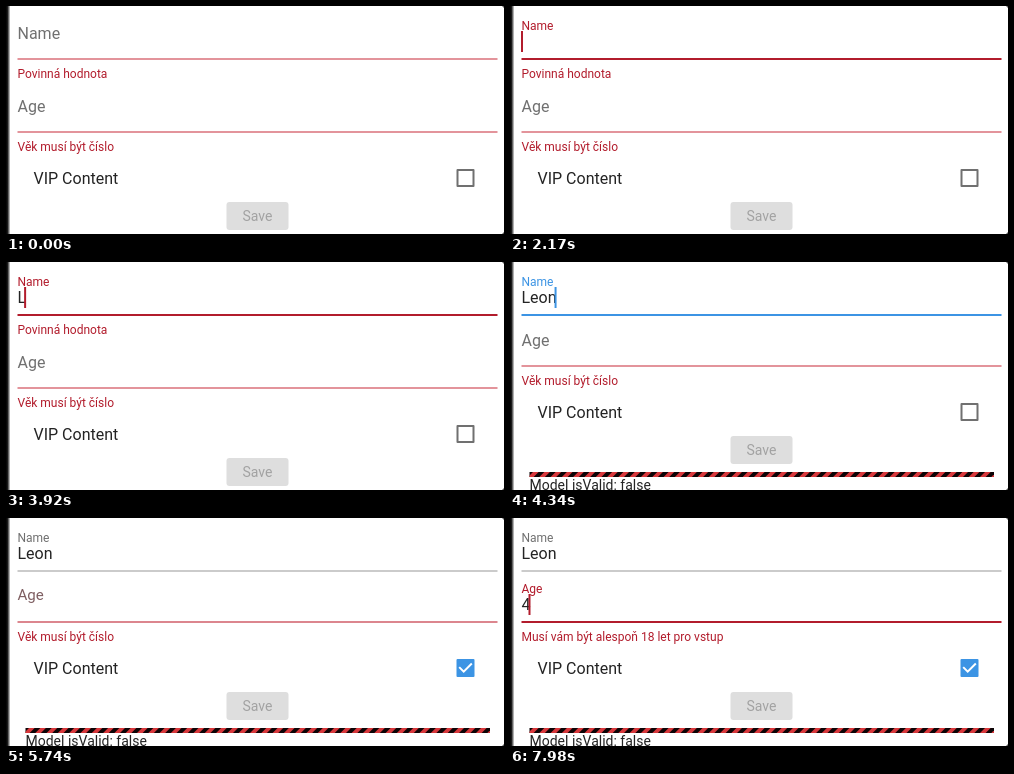
These frames come from a looping animation (498 px wide and 228 px high, 8 s). An HTML page with a canvas:

```html
<!DOCTYPE html>
<html lang="cs">
<head>
<meta charset="utf-8">
<title>Form validation</title>
<style>
html, body { margin: 0; width: 498px; height: 228px; overflow: hidden; background: #fff; }
canvas { display: block; }
</style>
</head>
<body>
<canvas id="stage" width="498" height="228"></canvas>
<script>
const LOOP = 8000;
const ctx = document.getElementById('stage').getContext('2d');

const RED = [178, 28, 44], BLUE = [60, 148, 228], GREY = [112, 112, 112];
const THIN_RED = [218, 112, 122], THIN_GREY = [186, 186, 186];
const INK = [36, 36, 36];

const NAME = 'Leon';
const NAME_KEYS = [3920, 4060, 4130, 4340];
const NAME_CARET = [[1120, 1680], [2170, 2730], [3220, 3780], [3920, 4480]];
const AGE_CARET = [[4480, 5040], [5530, 5640], [7000, 7560], [7840, LOOP]];

const clamp = v => Math.min(1, Math.max(0, v));
const lerp = (a, b, k) => a + (b - a) * k;
const mix = (a, b, k) => a.map((v, i) => lerp(v, b[i], k));
const rgb = (c, alpha = 1) => `rgba(${c.map(Math.round).join()},${alpha})`;
const linear = (t, start, length) => clamp((t - start) / length);
const within = (t, spans) => spans.some(([a, b]) => t >= a && t < b);

// cubic-bezier(.4, 0, .2, 1)
function ease(x) {
  if (x <= 0 || x >= 1) return clamp(x);
  let lo = 0, hi = 1, u = 0.5;
  for (let i = 0; i < 20; i++) {
    u = (lo + hi) / 2;
    const bx = 1.2 * u * (1 - u) ** 2 + 0.6 * u * u * (1 - u) + u ** 3;
    if (bx < x) lo = u; else hi = u;
  }
  return 3 * u * u * (1 - u) + u ** 3;
}
const tween = (t, start, length = 200) => ease(linear(t, start, length));

function text(str, x, y, size, color, alpha = 1) {
  ctx.font = `${size}px Roboto, sans-serif`;
  ctx.fillStyle = rgb(color, alpha);
  ctx.fillText(str, x, y);
}

function box(x, y, w, h, r, color) {
  ctx.fillStyle = color;
  ctx.beginPath();
  ctx.roundRect(x, y, w, h, r);
  ctx.fill();
}

// One text field; y is the baseline of its floating label.
function field(f) {
  const labelColor = mix(GREY, f.accent, f.focus);
  const thick = lerp(1.5, 2, f.focus);
  box(11.5, f.y + 29 - thick / 2, 480, thick, 0, rgb(mix(f.idle, f.accent, f.focus)));
  text(f.label, 11.5, lerp(f.y + 9, f.y, f.float), lerp(16, 12, f.float), labelColor);
  text(f.value, 11.5, f.y + 17, 16, INK);
  if (f.caret) {
    const x = Math.max(11, 9.5 + ctx.measureText(f.value).width);
    box(x, f.y + 1, 2, 21, 0, rgb(f.accent));
  }
}

function checkbox(t, y) {
  const ripple = tween(t, 5170, 100) - tween(t, 5290, 100);
  if (ripple > 0) {
    ctx.fillStyle = rgb(BLUE, 0.14);
    ctx.beginPath();
    ctx.arc(459.5, y + 9, 20 * ripple, 0, Math.PI * 2);
    ctx.fill();
  }
  const on = linear(t, 5230, 160);
  const fill = clamp(on * 2), tick = clamp(on * 2 - 1);
  const inset = lerp(2, 9, fill);
  box(450.5, y, 18, 18, 1, rgb(mix(GREY, BLUE, fill)));
  if (fill < 1) box(450.5 + inset, y + inset, 18 - 2 * inset, 18 - 2 * inset, 0, '#fff');
  if (!tick) return;
  const first = clamp(tick * 2), second = clamp(tick * 2 - 1);
  ctx.strokeStyle = '#fff';
  ctx.lineWidth = 2;
  ctx.beginPath();
  ctx.moveTo(453.2, y + 8.1);
  ctx.lineTo(453.2 + 4.5 * first, y + 8.1 + 4.5 * first);
  if (second) ctx.lineTo(457.7 + 8.1 * second, y + 12.6 - 8.1 * second);
  ctx.stroke();
}

function banner(y) {
  ctx.save();
  ctx.beginPath();
  ctx.rect(19.5, y, 464.5, 5);
  ctx.clip();
  ctx.fillStyle = '#0c0406';
  ctx.fillRect(19, y, 466, 5);
  ctx.fillStyle = '#d8383c';
  for (let x = 18; x < 490; x += 11.3) {
    ctx.beginPath();
    ctx.moveTo(x + 5, y);
    ctx.lineTo(x + 10.6, y);
    ctx.lineTo(x + 5.6, y + 5);
    ctx.lineTo(x, y + 5);
    ctx.fill();
  }
  ctx.restore();
}

function edges() {
  const g = ctx.createLinearGradient(0, 0, 4.5, 0);
  g.addColorStop(0, '#000');
  g.addColorStop(0.35, '#1c1c1c');
  g.addColorStop(1, '#fff');
  ctx.fillStyle = g;
  ctx.fillRect(0, 0, 4.5, 228);
  ctx.fillStyle = '#555';
  for (const [y, d] of [[0, 2], [228, -2]]) {
    ctx.beginPath();
    ctx.moveTo(498, y);
    ctx.lineTo(496, y);
    ctx.lineTo(498, y + d);
    ctx.fill();
  }
}

function draw(t) {
  ctx.fillStyle = '#fff';
  ctx.fillRect(0, 0, 498, 228);

  const valid = tween(t, 3920);
  const shift = t < 4120 ? 0 : -22;
  const nameFloat = tween(t, 1090);
  const ageFocus = tween(t, 4480) - tween(t, 5640) + tween(t, 7000);
  const typedAge = t >= 7840;

  field({
    label: 'Name', y: 24, float: nameFloat, focus: nameFloat - tween(t, 4480),
    accent: mix(RED, BLUE, valid), idle: mix(THIN_RED, THIN_GREY, valid),
    value: NAME.slice(0, NAME_KEYS.filter(k => t >= k).length),
    caret: within(t, NAME_CARET)
  });
  if (valid < 1) text('Povinná hodnota', 11.5, 72 - 3.5 * valid, 12, RED, 1 - valid);

  field({
    label: 'Age', y: 97 + shift, float: ageFocus, focus: ageFocus,
    accent: RED, idle: THIN_RED,
    value: typedAge ? '4' : '', caret: within(t, AGE_CARET)
  });
  text(typedAge ? 'Musí vám být alespoň 18 let pro vstup' : 'Věk musí být číslo',
    11.5, 145 + shift, 12, RED);

  text('VIP Content', 27.5, 178 + shift, 16, INK);
  checkbox(t, 163 + shift);

  box(220.5, 196 + shift, 62, 28, 3, '#dedede');
  text('Save', 236.5, 215 + shift, 14, [162, 162, 162]);

  banner(232 + shift);
  text('Model isValid: false', 19.5, 250 + shift, 14, INK);
  edges();
}

function tick() {
  draw(performance.now() % LOOP);
  requestAnimationFrame(tick);
}
tick();
</script>
</body>
</html>
```
